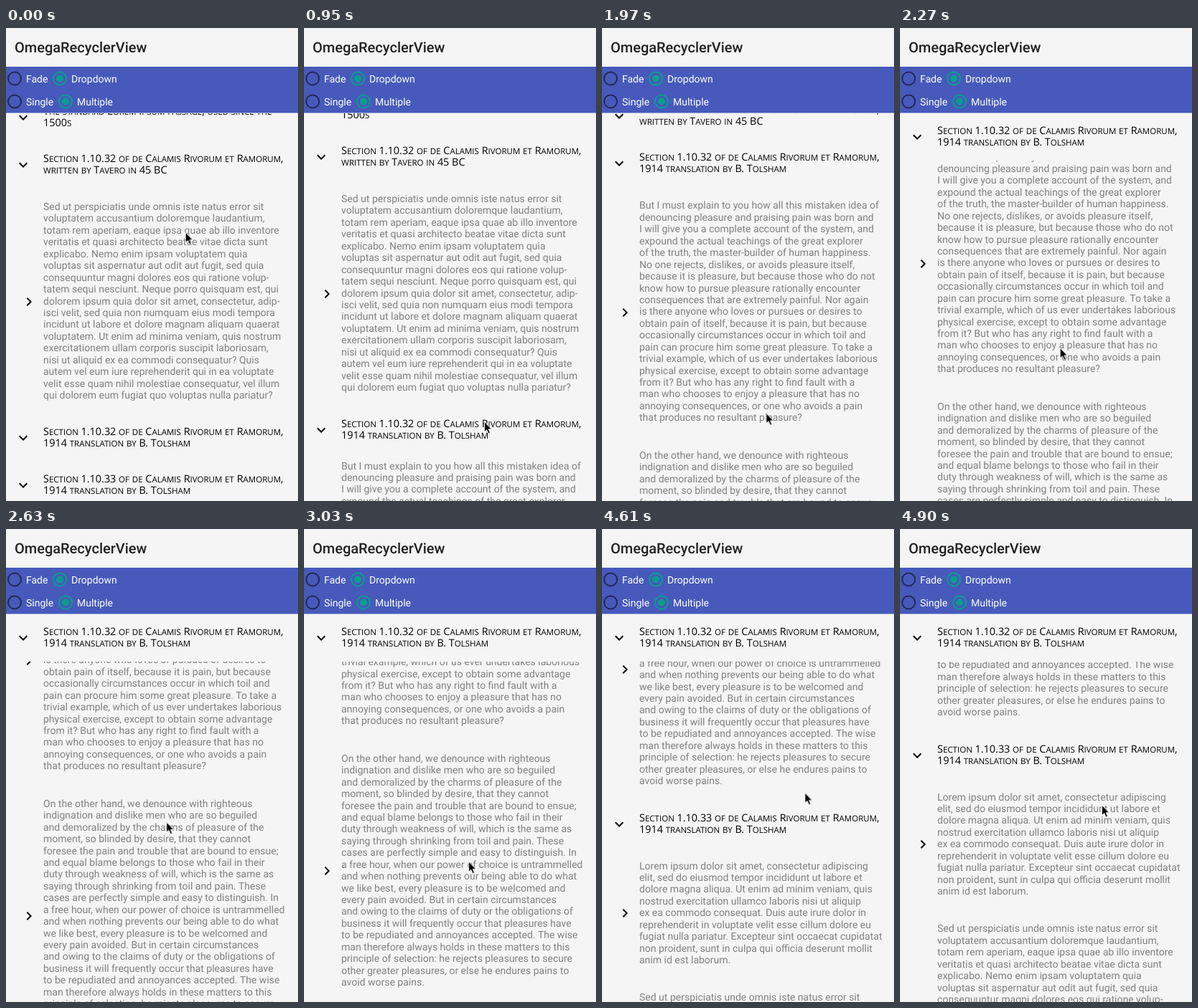
Animation of 407 by 660 pixels, one loop 5000 ms. Source, as an HTML page:

```html
<!DOCTYPE html>
<html lang="en">
<head>
<meta charset="utf-8">
<title>OmegaRecyclerView</title>
<style>
  html, body { margin: 0; width: 100%; height: 100%; overflow: hidden; background: #f5f5f5; }
  body { position: relative; font: 14px/16.44px Roboto, sans-serif; text-rendering: geometricPrecision; }
  #bar { position: absolute; left: 0; top: 0; }
  #list { position: absolute; left: 0; top: 119px; width: 407px; height: 541px;
          overflow: hidden; overflow-anchor: none; }
  header { position: sticky; top: 0; z-index: 1; box-sizing: border-box; height: 66px;
           padding: 16.5px 0 0 52px; background: #f5f5f5; color: #000; white-space: pre;
           font: 14.4px/16.5px "Open Sans", sans-serif; }
  small { font-size: .8em; line-height: 0; text-transform: uppercase; }
  .body { overflow: hidden; }
  .item { position: relative; padding: 18px 0 18px 52px; color: #808080; white-space: pre; }
  .icon { position: absolute; top: calc(50% - 12px); left: 12px; width: 24px; height: 24px; }
  .item .icon { left: 20px; }
  #cursor { position: absolute; left: 0; top: 0; z-index: 2; overflow: visible;
            animation: point 5s ease-in-out infinite; }
  /* tap a header, then drag the list upwards and come back down */
  @keyframes point {
    0% { transform: translate(250px, 284px); animation-timing-function: ease-out; }
    12%, 15.5% { transform: translate(147px, 549px); }
    19%, 20% { transform: translate(251px, 549px); }
    27% { transform: translate(236px, 320px); }
    34% { transform: translate(230px, 545px); }
    42% { transform: translate(228px, 535px); }
    49% { transform: translate(217px, 350px); }
    57% { transform: translate(232px, 490px); }
    68%, 72.5% { transform: translate(219px, 374px); }
    80.5%, 83% { transform: translate(147px, 615px); }
    87% { transform: translate(272px, 612px); }
    94% { transform: translate(284px, 330px); }
    98%, 100% { transform: translate(281px, 385px); }
  }
</style>
</head>
<body>
<svg id="bar" width="407" height="119" fill="#fff">
  <text x="12" y="34" font-size="20" font-weight="500" fill="#212121">OmegaRecyclerView</text>
  <rect y="54" width="407" height="64.5" fill="#475abb"/>
  <g fill="none" stroke-width="2">
    <g stroke="#212956"><circle cx="12" cy="70.5" r="9"/><circle cx="12" cy="102.5" r="9"/></g>
    <g stroke="#0a9d90"><circle cx="75" cy="70.5" r="9"/><circle cx="83" cy="102.5" r="9"/></g>
  </g>
  <g fill="#0a9d90"><circle cx="75" cy="70.5" r="5"/><circle cx="83" cy="102.5" r="5"/></g>
  <text x="28" y="76">Fade</text><text x="91" y="76">Dropdown</text>
  <text x="28" y="108">Single</text><text x="99" y="108">Multiple</text>
</svg>
<div id="list"></div>
<svg id="cursor" width="12" height="19">
  <path d="M.5 .5V14.5L3.7 11.6 6 17 8.4 16 6.1 10.8H10.4Z" stroke="#fff" stroke-width=".8"/>
</svg>
<script>
const sedUt = `Sed ut perspiciatis unde omnis iste natus error sit
voluptatem accusantium doloremque laudantium,
totam rem aperiam, eaque ipsa quae ab illo inventore
veritatis et quasi architecto beatae vitae dicta sunt
explicabo. Nemo enim ipsam voluptatem quia
voluptas sit aspernatur aut odit aut fugit, sed quia
consequuntur magni dolores eos qui ratione volup-
tatem sequi nesciunt. Neque porro quisquam est, qui
dolorem ipsum quia dolor sit amet, consectetur, adip-
isci velit, sed quia non numquam eius modi tempora
incidunt ut labore et dolore magnam aliquam quaerat
voluptatem. Ut enim ad minima veniam, quis nostrum
exercitationem ullam corporis suscipit laboriosam,
nisi ut aliquid ex ea commodi consequatur? Quis
autem vel eum iure reprehenderit qui in ea voluptate
velit esse quam nihil molestiae consequatur, vel illum
qui dolorem eum fugiat quo voluptas nulla pariatur?`;

const mustExplain = `But I must explain to you how all this mistaken idea of
denouncing pleasure and praising pain was born and
I will give you a complete account of the system, and
expound the actual teachings of the great explorer
of the truth, the master-builder of human happiness.
No one rejects, dislikes, or avoids pleasure itself,
because it is pleasure, but because those who do not
know how to pursue pleasure rationally encounter
consequences that are extremely painful. Nor again
is there anyone who loves or pursues or desires to
obtain pain of itself, because it is pain, but because
occasionally circumstances occur in which toil and
pain can procure him some great pleasure. To take a
trivial example, which of us ever undertakes laborious
physical exercise, except to obtain some advantage
from it? But who has any right to find fault with a
man who chooses to enjoy a pleasure that has no
annoying consequences, or one who avoids a pain
that produces no resultant pleasure?`;

const otherHand = `On the other hand, we denounce with righteous
indignation and dislike men who are so beguiled
and demoralized by the charms of pleasure of the
moment, so blinded by desire, that they cannot
foresee the pain and trouble that are bound to ensue;
and equal blame belongs to those who fail in their
duty through weakness of will, which is the same as
saying through shrinking from toil and pain. These
cases are perfectly simple and easy to distinguish. In
a free hour, when our power of choice is untrammelled
and when nothing prevents our being able to do what
we like best, every pleasure is to be welcomed and
every pain avoided. But in certain circumstances
and owing to the claims of duty or the obligations of
business it will frequently occur that pleasures have
to be repudiated and annoyances accepted. The wise
man therefore always holds in these matters to this
principle of selection: he rejects pleasures to secure
other greater pleasures, or else he endures pains to
avoid worse pains.`;

const lorem = `Lorem ipsum dolor sit amet, consectetur adipiscing
elit, sed do eiusmod tempor incididunt ut labore et
dolore magna aliqua. Ut enim ad minim veniam, quis
nostrud exercitation ullamco laboris nisi ut aliquip
ex ea commodo consequat. Duis aute irure dolor in
reprehenderit in voluptate velit esse cillum dolore eu
fugiat nulla pariatur. Excepteur sint occaecat cupidatat
non proident, sunt in culpa qui officia deserunt mollit
anim id est laborum.`;

const work = 'of de Calamis Rivorum et Ramorum,\n';
const translated = work + '1914 translation by B. Tolsham';
// openAt: moment the section drops down, in ms
const sections = [
  { title: 'The standard Lorem Ipsum passage, used since the\n1500s', items: [] },
  { title: `Section 1.10.32 ${work}written by Tavero in 45 BC`, items: [sedUt], openAt: -1000 },
  { title: `Section 1.10.32 ${translated}`, items: [mustExplain, otherHand], openAt: 800 },
  { title: `Section 1.10.33 ${translated}`, items: [lorem, sedUt], openAt: 4180 }
];

const flings = [
  { at: 0, lasts: 500, by: 11.5 },
  { at: 1000, lasts: 1200, by: 386 },
  { at: 2173, lasts: 900, by: 262 },
  { at: 3030, lasts: 450, by: 65 },
  { at: 4380, lasts: 520, by: 312 }
];

const icon = d => `<svg class="icon" viewBox="0 0 24 24"><path d="${d}"/></svg>`;
const down = icon('M16.59 8.59L12 13.17 7.41 8.59 6 10l6 6 6-6z');
const right = icon('M10 6L8.59 7.41 13.17 12l-4.58 4.59L10 18l6-6z');
const smallCaps = s => s.replace(/[a-z]+/g, '<small>$&</small>');

const list = document.getElementById('list');
list.innerHTML = sections.map(({ title, items }) => `<section>
  <header>${down}${smallCaps(title)}</header>
  <div class="body"><div>${items.map(i => `<div class="item">${right}${i}</div>`).join('')}</div></div>
</section>`).join('');

const drops = [...list.querySelectorAll('.body > div')]
  .map((el, i) => ({ el, openAt: sections[i].openAt, height: el.getBoundingClientRect().height }))
  .filter(d => d.height);

// decelerating progress from 0 to 1
function easeOut(t, at, lasts) {
  const u = Math.min(1, Math.max(0, (t - at) / lasts));
  return 1 - (1 - u) ** 2;
}

function draw(now) {
  const t = now % 5000;
  for (const { el, openAt, height } of drops)
    el.style.marginTop = height * (easeOut(t, openAt, 170) - 1) + 'px';
  list.scrollTop = flings.reduce((y, f) => y + f.by * easeOut(t, f.at, f.lasts), 27);
}

const start = performance.now();
function tick() {
  draw(performance.now() - start);
  requestAnimationFrame(tick);
}
tick();
</script>
</body>
</html>
```
